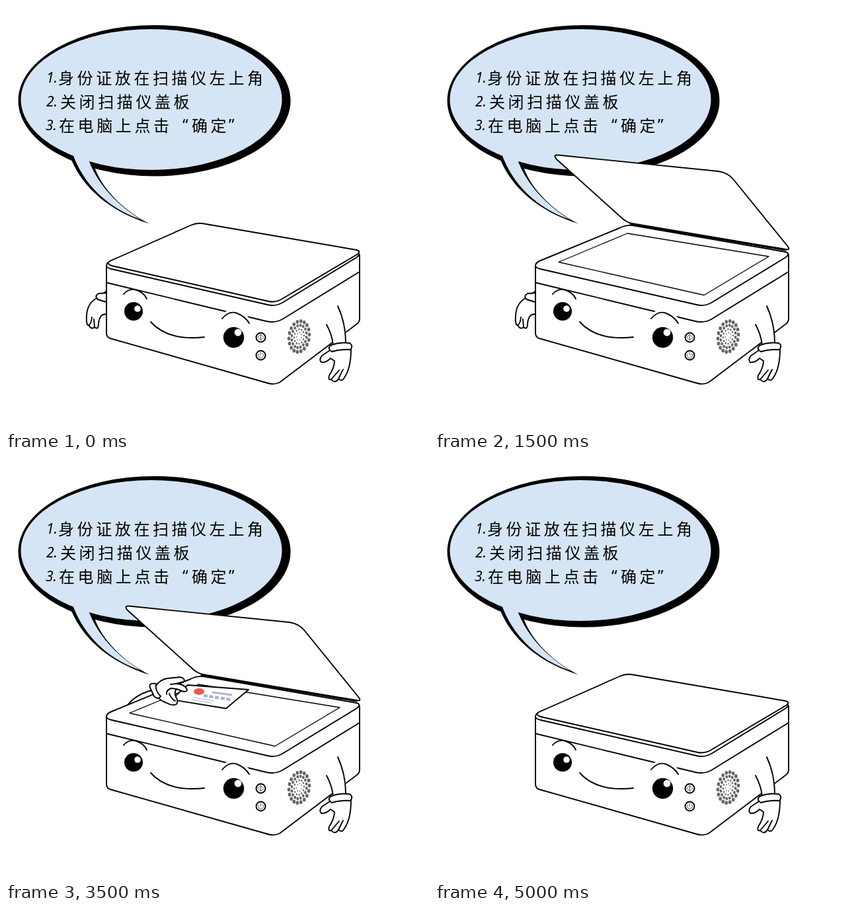
Write an HTML page that moves like this. It is 640 by 640 pixels and loops after 7500 ms.

```html
<!DOCTYPE html>
<html lang="zh">
<head>
<meta charset="utf-8">
<style>
html, body { margin: 0; width: 100%; height: 100%; overflow: hidden; background: #fff; }
svg { display: block; width: 100%; height: 100%; }
.ink { fill: #fff; stroke: #000; stroke-width: 1.9; stroke-linejoin: round; stroke-linecap: round; }
.line { fill: none; }
.thin { stroke-width: 1.3; }
.icon { stroke-width: .9; stroke: #444; }
.bold { stroke-width: 3; }
.halo { stroke: #fff; stroke-width: 8; }
text { font: 24px 'Noto Sans CJK SC', 'Noto Sans CJK', sans-serif; letter-spacing: 4.6px; }
.num { font: italic 21px 'Noto Sans', sans-serif; letter-spacing: 0; }
.mark { font-family: 'Noto Sans', sans-serif; letter-spacing: 0; }
</style>
</head>
<body>
<svg viewBox="0 0 640 640">
  <defs>
    <g id="grip" class="ink">
      <path d="M179 377Q168 360 168 346Q171 334 178 336Q185 328 189 335L205 346Q212 350 209 361L203 366Z"/>
      <path class="thin" d="M183 269L208 288L205 365L183 341Z"/>
      <path d="M178 337L174 347Q171 354 174 358L187 362Q193 358 188 348Q191 339 188 333Q183 331 181 338" stroke="none"/>
      <path class="line" d="M178 336L174 348M179 343Q184 330 188 334Q191 339 186 349Q188 354 186 359M189 347L205 365"/>
    </g>
    <g id="reach" class="ink">
      <path d="M222 340Q231 328 241 327L260 325Q269 327 266 332L254 335Q265 335 270 342Q273 347 266 347L255 343Q251 347 254 355Q258 361 255 366Q249 369 240 364Q230 361 223 351Z"/>
      <path class="line" d="M254 335L246 336M255 343L247 342Q239 345 240 351M244 350Q247 358 253 361"/>
      <path d="M224 335Q212 333 215 341L221 354Q227 360 231 354Q222 346 224 335Z"/>
    </g>
  </defs>

  <ellipse cx="224.5" cy="143.2" rx="206" ry="114.3"/>
  <path d="M96 225C111 268 149 308 217 329.500C175 308 145 275 134 244Z"/>
  <g fill="#d6e5f5">
    <ellipse cx="220" cy="141.500" rx="197.500" ry="106.500"/>
    <path d="M100 221C114 264 149 304 204 323C162 297 137 265 125 233Z"/>
  </g>
  <g>
    <text class="num" x="61" y="116">1.</text><text x="79" y="117.500">身份证放在扫描仪左上角</text>
    <text class="num" x="61" y="152">2.</text><text x="82" y="153.500">关闭扫描仪盖板</text>
    <text class="num" x="60" y="188">3.</text><text x="80" y="189.500">在电脑上点击</text>
    <text class="mark" x="267" y="188">“</text><text x="281" y="189.500">确定</text><text class="mark" x="337" y="188">”</text>
  </g>

  <g class="ink" data-arm="down">
    <path d="M152 431L146 437L137 442Q123 450 122 468Q121 483 125 483Q129 490 134 486Q140 491 140 480Q141 471 146 467L152 466Z"/>
    <path class="line" d="M125 483Q129 481 130 471M134 486L133 474"/>
    <path d="M155 434L140 435Q133 439 139 444L155 449Z"/>
  </g>
  <g data-arm="low">
    <path class="ink" d="M113 466Q128 480 155 475L155 455Q140 462 128 456Z"/>
    <use href="#grip" transform="translate(-70 130) scale(.95)"/>
  </g>
  <path class="ink" data-arm="place" d="M181 377Q194 356 217 346L224 354Q210 360 202 369Z"/>
  <path class="ink" data-arm="drop" d="M181 380Q192 361 220 353L227 361Q210 365 202 372Z"/>
  <use href="#grip" data-arm="raise"/>
  <g class="ink" data-arm="wave">
    <path d="M177 370Q167 358 169 346L174 331Q179 321 182 329Q187 320 191 327L188 344Q191 351 198 344Q205 335 209 341Q211 345 203 351Q203 360 200 365L182 376Z"/>
    <path class="line" d="M182 329L179 341M188 344Q187 349 190 352"/>
    <path d="M175 379Q174 369 181 370Q193 369 201 362L207 367L196 378Z"/>
  </g>

  <g class="ink">
    <path d="M152 393V495Q152 501 158 503L394 570Q405 574 414 569.500L531 481Q535 478 535 473V377L290 334Z"/>
    <path d="M152 393Q152 388 160 385L279 336Q288 331 299 332L530 372Q538 374 531 380L418 449Q407 455 396 452L160 398Q152 396 152 393Z"/>
    <path class="line thin" d="M187 387.500L291 344L505 379L407 437.500Z"/>
    <path class="line" d="M152 418.500L394 477Q407 480 418 474L535 402"/>
    <path class="line" d="M178 436Q186 426 198 430Q209 434 213 443M219 478Q245 507 300 501"/>
    <path class="halo" d="M330 470Q338 460 350 465Q360 468 365 475"/>
    <path class="line" d="M327 473Q338 460 350 465Q362 470 368 480"/>
    <path d="M485 482Q494 499 495 518L516 513Q514 480 502 454" stroke="none"/>
    <path class="line" d="M485 482Q494 499 495 514M502 454Q514 480 514 511"/>
    <path d="M490 521L478 529Q473 535 477 539Q484 540 491 533L497 537Q497 547 489 559Q487 567 492 565Q498 572 503 564Q509 569 512 562Q522 548 522 519Z"/>
    <path class="line" d="M492 565L504 551M503 564L510 550"/>
    <path d="M492 513Q505 508 520 510Q526 514 521 520Q505 519 493 523Q485 518 492 513Z"/>
    <circle cx="385.500" cy="501.500" r="7"/><circle cx="385.500" cy="528.500" r="7"/>
    <path class="line icon" d="M385.500 497L390 501.500L385.500 506L381 501.500ZM385.500 498V505M385.500 524V528M382.500 526A4 4 0 1 0 388.500 526"/>
  </g>
  <circle cx="193" cy="462" r="14"/><circle cx="199" cy="458" r="4.800" fill="#fff"/>
  <circle cx="344.500" cy="501.500" r="15.700"/><circle cx="351" cy="494" r="5.400" fill="#fff"/>
  <g id="speaker" fill="#666"></g>

  <g data-card="flat">
    <path class="ink" d="M275 345L367 352L333 380.500L250 367Z"/>
    <ellipse cx="292" cy="355" rx="8" ry="5" fill="#f0584e"/>
    <g fill="none" stroke="#a9b7cc">
      <path d="M312 356L342 360" stroke-width="3"/>
      <path d="M299 361L340 367" stroke-width="4.500" stroke-dasharray="6 2.700"/>
      <path d="M284 364L314 369M280 367L311 372" stroke-width="1.200"/>
    </g>
  </g>
  <path id="lid" class="ink"/>
  <path id="hinge" class="ink line bold" d="M296 330L530 369"/>
  <path class="ink thin" data-arm="place" d="M274 331.500L352 336L316 362L243 358Z"/>
  <use href="#reach" data-arm="place"/>
  <use href="#reach" data-arm="drop" x="3" y="8"/>
</svg>
<script>
const STEP = 500, LOOP = 7500;

// lid outlines, from closed to fully open
const LIDS = [
  'M157 386L279 332Q288 328 297 329L530 369Q538 371 531 376L418 443Q408 449 398 447L160 393Q151 390 157 386Z',
  'M160 349L278 330Q288 328 298 329L530 368Q538 370 530 374L415 408Q405 411 395 409L158 355Q149 352 160 349Z',
  'M172 263L415 295Q428 297 438 304L532 365Q537 369 530 368L300 329Q290 328 282 323L171 267Q164 262 172 263Z',
  'M186 225.500L428 250Q443 252 452 263L534 364Q538 370 530 368L298 329Q290 327 284 322L184 232Q178 225 186 225.500Z'
];

// lid index, arm pose, card pose for each step; the last one holds
const POSES = [
  [0, 'down'], [1, 'down'], [2, 'down'], [3, 'down'], [3, 'low'], [3, 'raise'],
  [3, 'place'], [3, 'drop', 'flat'], [3, 'wave', 'flat'], [1, ''], [0, '']
];

const $ = id => document.getElementById(id);
const arms = document.querySelectorAll('[data-arm]');
const card = document.querySelector('[data-card]');
const show = (el, on) => { el.style.display = on ? '' : 'none'; };

function drawSpeaker() {
  let dots = '';
  // count, ring scale, dot radius
  [[18, 1, 2.3], [16, .73, 1.9], [12, .48, 1.2], [7, .25, .8]].forEach(([n, k, r], ring) => {
    for (let i = 0; i < n; i++) {
      const a = (i + ring / 2) / n * Math.PI * 2;
      const x = 443.5 + 15.5 * k * Math.cos(a);
      const y = 500 + 23 * k * Math.sin(a) - 3 * k * Math.cos(a);
      dots += `<ellipse cx="${x}" cy="${y}" rx="${r}" ry="${r * 1.25}"/>`;
    }
  });
  $('speaker').innerHTML = dots;
}

let last = -1;
function render(time) {
  const i = Math.min(Math.floor(time % LOOP / STEP), POSES.length - 1);
  if (i === last) return;
  last = i;
  const [lid, arm, cardPose] = POSES[i];
  $('lid').setAttribute('d', LIDS[lid]);
  show($('hinge'), lid > 1);
  arms.forEach(el => show(el, el.dataset.arm === arm));
  show(card, cardPose);
}

drawSpeaker();
render(0);
const start = performance.now();
requestAnimationFrame(function tick() {
  render(performance.now() - start);
  requestAnimationFrame(tick);
});
</script>
</body>
</html>
```
